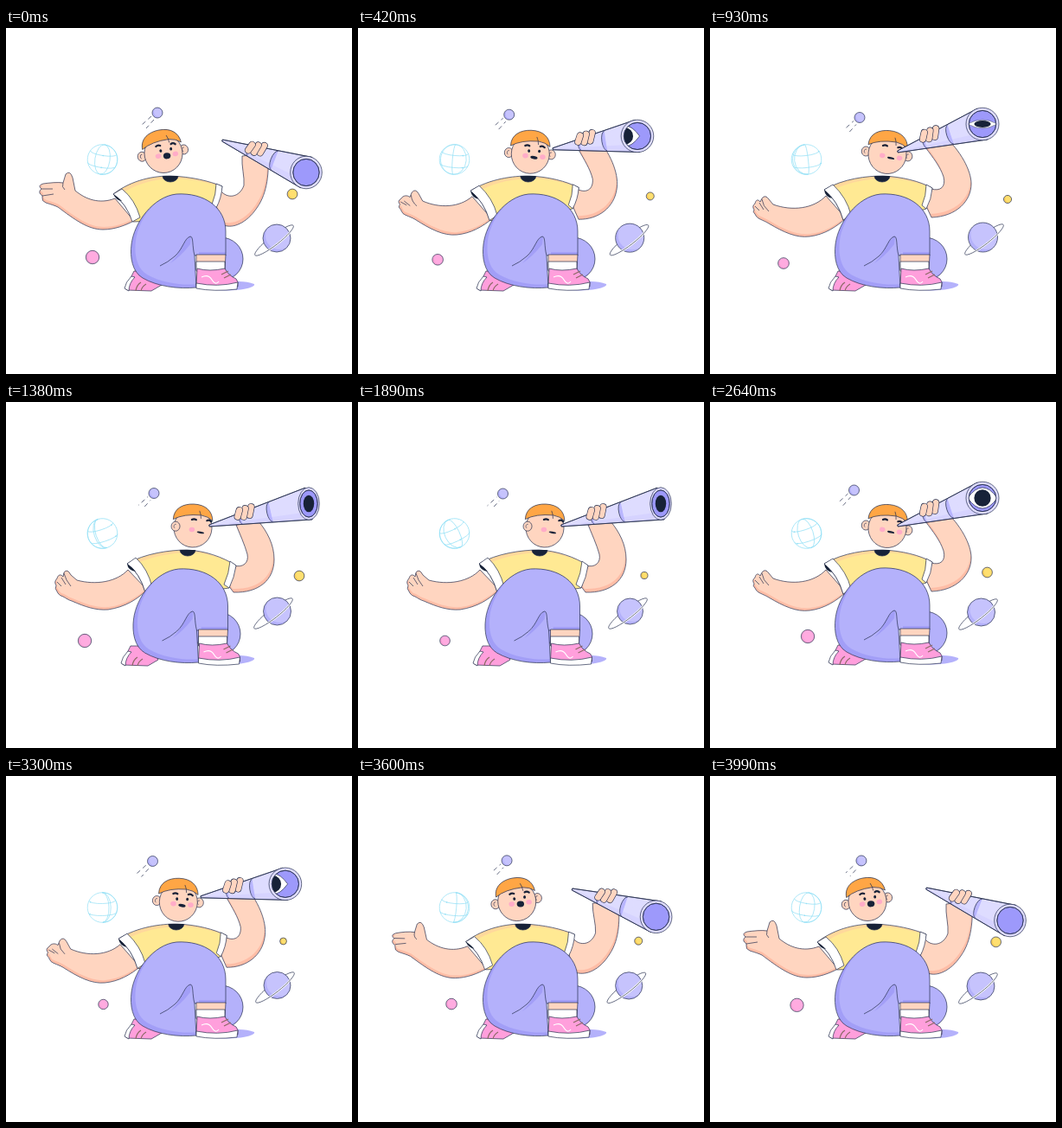
These frames come from a looping animation (400 by 400 pixels, 4020 ms). An HTML page with a canvas:

```html
<!DOCTYPE html>
<html>
<head>
<meta charset="utf-8">
<title>Stargazer</title>
<style>
html, body { margin: 0; width: 100%; height: 100%; overflow: hidden; background: #fff; }
canvas { display: block; width: 400px; height: 400px; }
</style>
</head>
<body>
<canvas id="stage" width="400" height="400"></canvas>
<script>
const g = document.getElementById('stage').getContext('2d');
const LOOP = 4020, TAU = Math.PI * 2;
const INK = '#27304f', DARK = '#172238', SKIN = '#ffd5c0', BLUSH = '#ffbda6', LILAC = '#b4b1fb',
  MIST = '#c6c3fd', DEEP = '#a29ef7', PALE = '#dedcff', PINK = '#ff9fdc', YELLOW = '#ffe993';

// Pose weights: wide (arms open), near (eye at the lens), far (turned right)
let wide, near, far;

const ease = (t, from, to) => {
  const x = Math.min(1, Math.max(0, (t - from) / (to - from)));
  return x * x * (3 - 2 * x);
};
const mix = (a, b, c) => a * wide + b * near + c * far;
const blend = (a, b, c) => {
  const nb = b.match(/[\d.]+/g), nc = c.match(/[\d.]+/g);
  let i = 0;
  return new Path2D(a.replace(/[\d.]+/g, n => mix(+n, nb[i], nc[i++]).toFixed(2)));
};

// Smooth periodic curve through values at fixed moments
const MOMENTS = [0, 930, 1380, 1890, 2640, 3300];
function drift(t, v) {
  const n = v.length;
  const time = k => MOMENTS[(k + n) % n] + LOOP * Math.floor(k / n);
  const val = k => v[(k + n) % n];
  const slope = k => (val(k + 1) - val(k - 1)) / (time(k + 1) - time(k - 1));
  let i = n - 1;
  while (MOMENTS[i] > t) i--;
  const h = time(i + 1) - time(i), u = (t - time(i)) / h, w = 1 - u;
  return val(i) * w * w * (1 + 2 * u) + val(i + 1) * u * u * (3 - 2 * u) +
    h * u * w * (slope(i) * w - slope(i + 1) * u);
}

function draw(path, fill, line = INK, width = 0.7) {
  if (fill) { g.fillStyle = fill; g.fill(path); }
  if (line) { g.strokeStyle = line; g.lineWidth = width; g.stroke(path); }
}
// Fills with a shadow rim left by an offset copy
function shaded(path, fill, shade, dx, dy) {
  g.save();
  g.clip(path);
  draw(path, shade, null);
  g.translate(dx, dy);
  draw(path, fill, null);
  g.restore();
  draw(path);
}
function oval(x, y, rx, ry = rx, turn = 0, from = 0, to = TAU) {
  const p = new Path2D();
  p.ellipse(x, y, rx, ry, turn, from, to);
  return p;
}
const path = d => new Path2D(d);
function at(x, y, turn, paint) {
  g.save();
  g.translate(x, y);
  g.rotate(turn);
  paint();
  g.restore();
}

function sky(t) {
  const phase = TAU * t / LOOP, pulse = Math.cos(3 * phase);

  const mx = drift(t, [175, 173, 171, 167.5, 166.5, 169.5]);
  const my = drift(t, [98, 103.5, 105.5, 106, 102, 98.5]);
  shaded(oval(mx, my, 6), MIST, LILAC, 2, -1);
  g.setLineDash([5, 4]);
  g.lineDashOffset = -t / 60;
  draw(path(`M${mx - 7} ${my + 4}l-11 10M${mx - 4} ${my + 8}l-9 10`));
  g.setLineDash([]);

  at(111.5, 152, -0.15 + 0.3 * Math.cos(phase), () => {
    const line = '#93e0f6';
    draw(oval(0, 0, 17.3), null, line);
    for (let i = 0; i < 3; i++) {
      const a = phase + i * Math.PI / 3, c = Math.cos(a);
      draw(oval(0, 0, Math.abs(17.3 * c), 17.3, 0, c > 0 ? -1.57 : 1.57, c > 0 ? 1.57 : 4.71), null, line);
    }
    for (const y of [-8, 6]) {
      const r = Math.sqrt(300 - y * y);
      draw(oval(0, y, r, 3.5, 0, 0, Math.PI), null, line);
      draw(oval(r * Math.sin(phase), y + 3.5 * Math.abs(Math.cos(phase)), 0.8), line, null);
    }
  });

  shaded(oval(drift(t, [100, 85, 91, 100.5, 113, 112.5]),
    drift(t, [265, 272, 276, 276, 271, 264]), 6.7 + pulse), '#ffabe0', '#fb9fd6', 2, -1);
  shaded(oval(drift(t, [331, 344, 339, 331, 320.5, 320.5]),
    drift(t, [192, 198, 201, 200.5, 197, 191]), 4.9 + pulse), '#ffdf70', '#f9cf5c', 2, -1);

  const sx = drift(t, [313, 315.5, 313.5, 314.5, 313.5, 313.5]);
  const sy = drift(t, [243, 242, 242, 242, 243, 242]);
  const rx = drift(t, [310, 317, 309, 312, 310, 311]);
  const ring = (from, to) => {
    const p = oval(rx, sy + 2.5, 28, 5.5, -0.66, from, to);
    draw(p, null, '#fff', 2.4);
    draw(p);
  };
  ring(Math.PI, TAU);
  shaded(oval(sx, sy, drift(t, [16, 17, 16, 15, 16, 15.5])), MIST, LILAC, 3, -3);
  ring(0, Math.PI);
}

function shifted(dx, paint) {
  at(dx * far, far, 0, paint);
}

function backLeg() {
  draw(path('M240 303C270 305 289 300 287 296Q275 291 255 294Z'), LILAC, null);
  shifted(-3, () => shaded(oval(248, 267, 26, 25), LILAC, DEEP, 2, -3));
  shifted(-4, () => {
    draw(path('M148 281L172 281 180 297L168 304 140 303Q135 301 142 293Z'), PINK);
    draw(path('M145 287Q138 294 137 301L142 304Q142 295 149 288Z'), '#fff');
    draw(path('M150 304Q151 297 156 294M156 304Q157 299 162 296'), null, '#8d6a66', 1.2);
  });
}

function arms() {
  shaded(blend(
    'M126 197C108 204 92 198 80 188L77 173Q74 164 69 169L66 179C60 178 50 179 43 180Q36 182 41 186Q36 190 42 194L42 196Q41 200 46 202C52 204 56 205 60 207C80 222 95 233 112 233C126 233 138 228 148 223Z',
    'M134 194C120 209 95 212 73 204L68 198Q64 192 60 197L58 201C56 198 53 198 52 203Q48 206 51 210Q49 213 52 215L53 217Q55 220 58 221C62 223 65 224 68 226C85 236 100 243 115 241C132 239 146 230 157 220Z',
    'M141 194C128 208 104 212 82 206L75 200Q71 192 67 197L66 202C64 199 60 199 59 204Q55 208 58 212Q56 216 59 219L60 221Q62 224 66 225C70 227 72 229 76 230C92 237 104 241 118 240C138 237 152 228 163 217Z'),
    SKIN, BLUSH, 1, -3);
  draw(blend('M41 186L54 186M42 194L55 192M66 179Q64 184 68 187',
    'M52 206L57 211M57 202L62 210M60 198Q61 206 68 212',
    'M59 208L64 213M64 203L69 211M67 198Q69 206 75 213'));
  shaded(blend(
    'M248 188C256 198 270 196 275 182C276 172 272 160 273 148L303 145C304 165 303 190 290 208C278 226 262 232 252 228L243 206Z',
    'M256 186C266 189 273 184 270 172C266 160 258 150 249 138L270 124C290 142 302 165 302 180C302 200 285 218 256 219L250 206Z',
    'M263 189C274 192 281 186 279 176C276 165 270 152 266 142L292 138C302 150 310 165 310 182C310 205 293 221 263 220L257 212Z'),
    SKIN, BLUSH, -1, -4);
}

function shirt() {
  shaded(blend(
    'M124 192C146 175 172 171 190 171C215 172 235 177 250 183L243 208 200 222 147 224Q140 204 124 192Z',
    'M132 187C154 174 182 171 200 171C222 172 242 177 257 185L250 209 205 222 154 222Q148 200 132 187Z',
    'M140 187C160 175 190 171 209 171C230 172 250 179 266 189L258 215 210 222 161 220Q155 198 140 187Z'),
    YELLOW, '#ffd89b', 5, 3);
  // Left cuff with a glimpse into the sleeve
  draw(blend('M124 192Q140 204 146 224L155 219Q149 198 134 186Z',
    'M132 187Q148 200 154 222L163 216Q158 196 142 181Z',
    'M140 187Q155 198 161 220L169 214Q164 193 150 180Z'), '#fff');
  draw(blend('M124 192Q130 196 134 200Q127 199 124 192Z',
    'M132 187Q138 192 141 197Q133 195 132 187Z',
    'M140 187Q146 191 150 196Q141 195 140 187Z'), DARK, null);
  draw(blend('M250 183Q249 197 243 208L238 204Q243 192 243 180Z',
    'M257 185Q256 198 250 209L245 205Q250 194 250 181Z',
    'M266 189Q264 203 258 215L252 211Q258 198 259 184Z'), '#fff');
  draw(oval(mix(190, 199, 210), 171, 9, 7, 0, 0, Math.PI), DARK);
}

function frontLeg() {
  shifted(2.5, () => {
    shaded(path('M197 192C230 190 254 208 254 235L254 263 218 263 220 300C200 302 175 299 158 289C146 282 143 265 145 250C148 225 170 195 197 192Z'),
      LILAC, DEEP, 5, -4);
    draw(path('M214 241C206 243 204 258 190 272Q202 264 213 250Z'), DEEP, null);
    draw(path('M218 263C215 252 217 241 213 241C206 243 205 255 195 264Q187 271 178 275'));
    draw(path('M220 262H254L253 280H220Z'), SKIN);
    draw(path('M220 270H253V281H220Z'), '#fff');
    draw(path('M221 278Q235 282 253 278Q257 286 266 290Q269 293 268 299L220 298Z'), PINK);
    draw(path('M220 295Q245 300 268 294L267 302Q240 305 220 301Z'), '#fff');
    draw(path('M226 288Q234 284 238 291T246 293'), null, '#fff', 1.2);
    draw(path('M249 285L257 281M252 289L260 285'), null, '#8d6a66', 1.3);
  });
}

function head() {
  const turned = far > 0.5, look = mix(3.5, 4.5, 9);
  at(mix(182, 205, 216), mix(145, 146, 145.5), mix(-0.19, 0.1, 0.04), () => {
    const ear = (x, y) => {
      draw(oval(x, y, 5, 5.5), SKIN);
      draw(oval(x, y, 2, 2.5, 0, 2, 5), null, INK, 0.6);
    };
    const leftEar = () => ear(mix(-25, -25, -20), -1);
    if (!turned) leftEar();
    ear(mix(24, 24, 15), 0);
    draw(oval(0, 0, 22, 22.5), SKIN);
    draw(path('M-23 -9C-23 -22 -12 -27.5 0 -27.5C14 -27.5 22 -20 22.5 -9Q17 -14 9 -15Q-11 -16 -23 -9Z'), '#ffa645');
    draw(path('M7 -20Q9 -16 9 -11'));
    if (turned) leftEar();
    g.lineCap = 'round';
    const dab = (x, y, tilt) => draw(path(`M${look + x - 2.5} ${y}q2.5 -1.5 5 ${tilt}`), null, DARK, 2.2);
    dab(-8, -9.5, 0);
    dab(9.5, -9, 1);
    g.lineCap = 'butt';
    draw(oval(look - 10, 2, 3.3, 2.8), '#ffacc8', null);
    if (!turned) draw(oval(look + 10, 3, 3.3, 2.8), '#ffacc8', null);
    if (wide > 0.1) {
      draw(oval(look - 6, -3.6, 1.5, 1.8), DARK, null);
      draw(oval(look + 6, -3.6, 1.5, 1.8), DARK, null);
    }
    draw(oval(look, mix(3.5, 4, 5), 4.2, mix(3.6, 1.2, 1.1), 0.15), DARK, null);
  });
}

function telescope(t) {
  const x = mix(250, 217, 235), y = mix(130, 143, 143);
  const lx = mix(347, 315, 350), ly = mix(167, 111, 117.5);
  const dx = lx - x, dy = ly - y, len = Math.hypot(dx, dy), turn = Math.atan2(dy, dx);
  const r = 18.8, rx = mix(18.3, 19, 12.3);

  at(x, y, turn, () => {
    const tube = path(`M0 -1L${len} ${-r}V${r}L0 1Z`);
    draw(tube, PALE);
    g.save();
    g.clip(tube);
    for (const k of [0.3, 0.58]) {
      const h = 1 + k * (r - 1), w = h * 0.4;
      draw(oval(len * k + w, 0, w, h, 0, 1.57, 4.71), '#b9b6ff');
      draw(oval(len * k + w + 5, 0, w, h), PALE, null);
    }
    draw(path(`M0 0L${len} ${r * 0.5}V${r}L0 1Z`), 'rgba(165,162,250,.15)', null);
    g.restore();
    draw(tube, null);
  });

  at(lx, ly, 0, () => {
    draw(oval(0, 0, rx, r), PALE);
    const glass = oval(0, 0, rx * 0.83, r * 0.83);
    draw(glass, '#9d99fb');
    g.save();
    g.clip(glass);
    g.translate(-58 * wide, 0);
    const blink = 1 - 0.6 * Math.max(0, 1 - Math.abs(t - 930) / 110);
    g.scale(rx / r, blink);
    if (wide < 0.6) {
      g.globalAlpha = 1 - far;
      draw(path('M-17 0Q0 -24 17 0Q0 24 -17 0Z'), '#fff');
      g.globalAlpha = 1;
      draw(oval(0, 0, 9.5, 9.8), DARK, null);
    }
    g.restore();
    draw(glass, null);
  });

  at(mix(289, 253, 275), mix(138, 122, 126.5), turn * 0.6, () => {
    g.lineCap = 'round';
    for (const i of [1, 0, -1]) {
      const finger = path(`M${7 * i + 2} ${-3 - i}L${7 * i - 1} ${6 - Math.abs(i)}`);
      draw(finger, null, INK, 8.2);
      draw(finger, null, SKIN, 6.9);
    }
    g.lineCap = 'butt';
  });
}

function frame(now) {
  const t = now % LOOP;
  wide = 1 - ease(t, 50, 600) + ease(t, 3110, 3700);
  far = ease(t, 1080, 1380) - ease(t, 2200, 2560);
  near = 1 - wide - far;
  g.fillStyle = '#fff';
  g.fillRect(0, 0, 400, 400);
  sky(t);
  backLeg();
  arms();
  shirt();
  frontLeg();
  head();
  telescope(t);
  requestAnimationFrame(frame);
}
requestAnimationFrame(frame);
</script>
</body>
</html>
```
